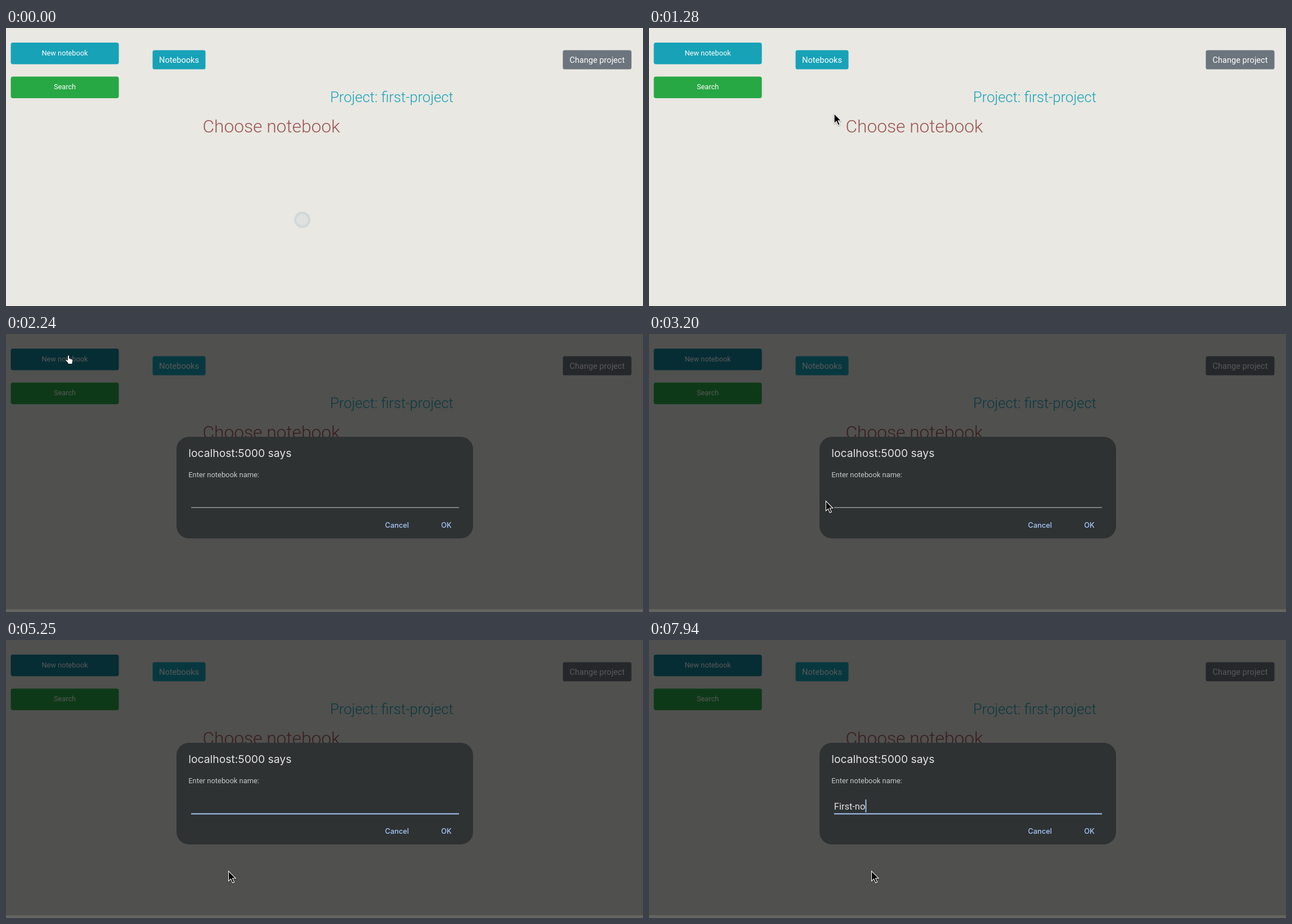
Recreate the animation shown at these times as an HTML page. Size 1132x495 px, loop 8 s.

```html
<!DOCTYPE html>
<html lang="en">
<head>
<meta charset="utf-8">
<title>New notebook</title>
<style>
  html, body { margin: 0; width: 100%; height: 100%; overflow: hidden; background: #e9e8e2; }
  svg { display: block; width: 1132px; height: 495px; }
  text { font-family: Roboto, sans-serif; white-space: pre; }
  .mid { text-anchor: middle; fill: #fff; }
  .small { font-size: 12.75px; }
  .large { font-size: 14.6px; }
  .light { font-weight: 300; }
  .ui { font-family: Inter, sans-serif; }
  .action { font-size: 12.8px; font-weight: 500; fill: #a8c7fa; text-anchor: middle; }
</style>
</head>
<body>
<svg viewBox="0 0 1132 495">
  <rect width="1132" height="495" fill="#e9e8e2"/>
  <rect id="newButton" x="8.5" y="26" width="192" height="38.5" rx="4"/>
  <rect id="searchButton" x="8.5" y="86.5" width="192" height="38.5" rx="4"/>
  <rect x="260.5" y="39.5" width="94" height="34" rx="3.6" fill="#17a2b8"/>
  <rect x="989.5" y="39.5" width="122" height="34" rx="3.6" fill="#6c757d"/>
  <text class="mid small" x="104.5" y="48.8">New notebook</text>
  <text class="mid small" x="104.5" y="109.3">Search</text>
  <text class="mid large" x="307.5" y="61.7">Notebooks</text>
  <text class="mid large" x="1050.5" y="61.7">Change project</text>
  <text class="light" x="685.5" y="131.8" font-size="25.6" fill="#17a2b8" text-anchor="middle">Project: first-project</text>
  <text class="light" x="471.5" y="185.8" font-size="31.7" fill="#9c5555" text-anchor="middle">Choose notebook</text>

  <g id="dialog">
    <path d="M0 0H1132V490H0Z" opacity=".655"/>
    <path d="M0 490H1132V495H0Z" opacity=".57"/>
    <rect x="303" y="183" width="527" height="181" rx="22" fill="#2e3233"/>
    <text class="ui" x="324.3" y="219" font-size="19.3" fill="#e3e3e3">localhost:5000 says</text>
    <text x="324.3" y="255.2" font-size="12.9" fill="#c7c9c8">Enter notebook name:</text>
    <rect id="underline" x="329" y="308.5" width="476"/>
    <text id="entry" x="328.8" y="302" font-size="16.45" fill="#e3e3e3"></text>
    <rect id="caret" y="284" width="1.8" height="23" fill="#a8c7fa"/>
    <text class="ui action" x="694.8" y="344.8">Cancel</text>
    <text class="ui action" x="782.6" y="344.8">OK</text>
  </g>

  <g id="busy" fill="none">
    <circle cx="526.5" cy="341.5" r="12" fill="#dfe1df" stroke="#d3d7d8" stroke-width="5"/>
    <circle cx="526.5" cy="341.5" r="10" stroke="#e0e3e3"/>
  </g>
  <g id="pointer">
    <path id="arrow" d="M.5.5V18.2L4.6 14.4L7.7 21.4L10.6 20.1L7.5 13.2H12.9Z" stroke="#fff" stroke-width="1.1"
          style="filter:drop-shadow(.5px 1px 1px #0006)"/>
    <path id="hand" d="M-1.5 9V1.4Q0-1 1.5 1.4V6L6 7.2Q8 7.8 7.7 10L7 13.2V16H-1V14L-5 9.8Q-5.3 7.4-3.4 8.2Z"
          fill="#fff" stroke="#111"/>
    <path id="beam" d="M-3-10Q0-10 0-8Q0-10 3-10M0-8V8M-3 10Q0 10 0 8Q0 10 3 10" fill="none" stroke="#ddd" stroke-width="1.2"/>
  </g>
</svg>
<script>
  const LOOP = 8000;
  const el = id => document.getElementById(id);
  const show = (id, on) => el(id).setAttribute('visibility', on ? 'inherit' : 'hidden');

  // Pointer path: time, x, y
  const route = [
    [0, 521, 324], [790, 521, 324], [1000, 462, 262], [1280, 329, 152], [1600, 184, 97],
    [1740, 135, 61], [1900, 111, 37.5], [2700, 111, 37.5], [3000, 195, 158], [3220, 325, 310],
    [3360, 360, 338], [3520, 356, 320], [3600, 352, 308], [3860, 352, 308],
    [4040, 367, 323], [4250, 384, 374], [4550, 395, 411], [LOOP, 395, 411]
  ];
  const name = 'First-no';
  const keyTimes = [5380, 5700, 5960, 6150, 6280, 7370, 7820, 7940];
  const focusTime = 3720;
  const blinkTimes = [4260, 4800, 5250, 5380, 6790, 7300];

  function pointerAt(t) {
    const i = route.findIndex(p => p[0] > t);
    const [t0, x0, y0] = route[i - 1], [t1, x1, y1] = route[i];
    const k = (t - t0) / (t1 - t0);
    return [x0 + (x1 - x0) * k, y0 + (y1 - y0) * k];
  }

  function render(t) {
    const [x, y] = pointerAt(t);
    const dialogOpen = t >= 2240;
    const overColumn = !dialogOpen && x < 200;
    const overNew = overColumn && y > 26 && y < 64.5;
    const overSearch = overColumn && y > 86.5 && y < 125;
    const pressed = t >= 2120 && !dialogOpen;

    el('newButton').setAttribute('fill', pressed ? '#117a8b' : overNew || dialogOpen ? '#138496' : '#17a2b8');
    el('searchButton').setAttribute('fill', overSearch ? '#218838' : '#28a745');

    const busy = t < 380;
    const hand = overNew || overSearch || (dialogOpen && t < 2750);
    const beam = t >= 3590 && y < 311;
    show('busy', busy);
    show('hand', hand);
    show('beam', beam);
    show('arrow', !busy && !hand && !beam);
    el('pointer').setAttribute('transform', `translate(${x} ${y})`);

    show('dialog', dialogOpen);
    const focused = t >= focusTime;
    el('underline').setAttribute('fill', focused ? '#a8c7fa' : '#c7c9c8');
    el('underline').setAttribute('height', focused ? 2 : 1);
    const entry = el('entry');
    entry.textContent = name.slice(0, keyTimes.filter(k => k <= t).length);
    const width = entry.textContent ? entry.getComputedTextLength() : 0;
    el('caret').setAttribute('x', 329 + width);
    show('caret', focused && blinkTimes.filter(b => b <= t).length % 2 === 0);
  }

  const start = performance.now();
  function tick() {
    render((performance.now() - start) % LOOP);
    requestAnimationFrame(tick);
  }
  tick();
</script>
</body>
</html>
```
